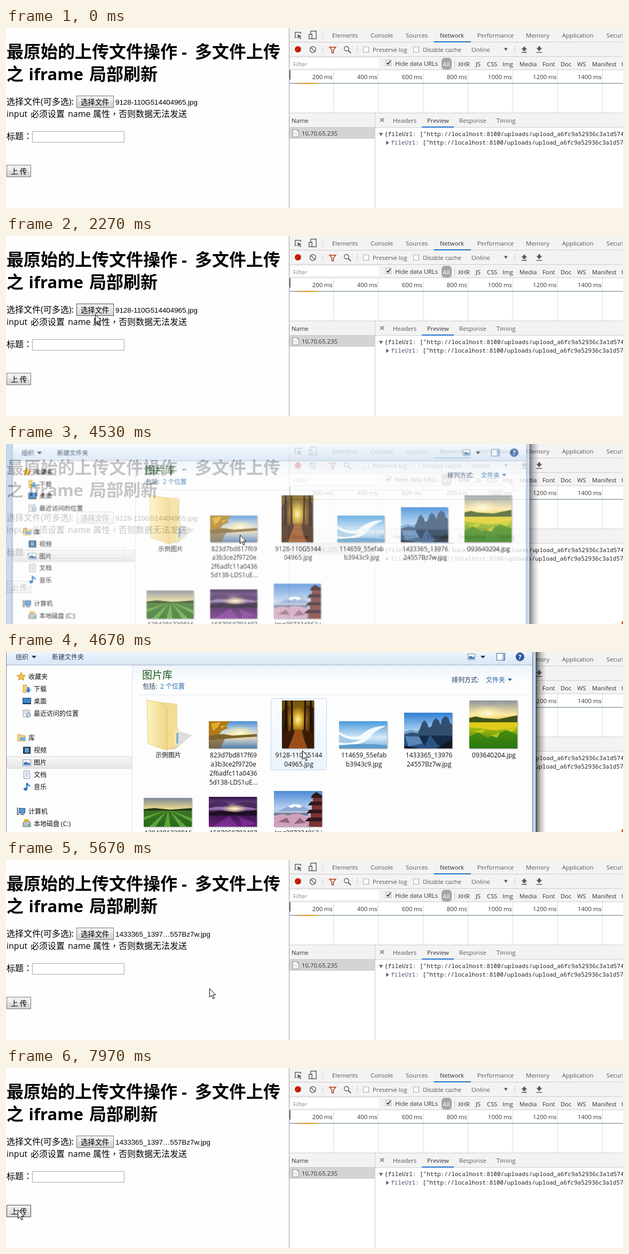
Write an HTML page that moves like this. It is 1156x338 px and loops after 8 s.

```html
<!DOCTYPE html>
<html lang="zh-CN">
<head>
<meta charset="utf-8">
<title>多文件上传</title>
<style>
html, body { margin: 0; width: 100%; height: 100%; overflow: hidden; background: #fff; }
svg { display: block; }
text { font: 16px "Open Sans", "Noto Sans CJK SC", sans-serif; white-space: pre; }
.mid { font-family: "Noto Sans CJK TC", sans-serif; }
.h1 text { font-size: 32px; font-weight: 700; }
.h1 .latin { font-size: 31px; }
.btn text { font-size: 13.33px; }
.btn rect { fill: url(#btn); stroke: #7c7c7c; }
.btn .hover { fill: url(#btnHover); stroke: #4c4c4c; }
.btn .press { fill: #000; fill-opacity: .1; stroke: #4c4c4c; }
.file text { font: 13.33px "Liberation Sans", "Noto Sans CJK SC", sans-serif; }
.tools text { font-size: 11.3px; fill: #5a5a5a; }
.tools .on { fill: #333; }
.tools .code { font: 11px "Noto Sans Mono", monospace; fill: #222; }
.line { stroke: #ccc; fill: none; }
.icon { stroke: #5f5f5f; stroke-width: 1.4; fill: none; }
.box { fill: #fff; stroke: #a6a6a6; }
.dialog text { font-size: 12px; fill: #111; }
.dialog .bar text { fill: #1e395b; }
.names { text-anchor: middle; }
.thumb { filter: drop-shadow(1px 1px 1px #0006); }
.hl { fill: url(#hl); stroke: #b9d7f3; }

/* timeline */
.k { animation: 8s step-end infinite; }
.cursor { animation-name: move, cursorSeen; }
.dialog { animation-name: dialog; transform-origin: 490px 320px; }
@keyframes move {
  0% { transform: translate(528px, 322px); }
  7.75% { transform: translate(528px, 322px); animation-timing-function: steps(10); }
  17% { transform: translate(154px, 137px); }
  28.375% { transform: translate(167px, 147px); }
  32.375% { transform: translate(167px, 140px); }
  38.875% { transform: translate(190px, 132px); }
  42% { transform: translate(190px, 132px); animation-timing-function: steps(2, jump-both); }
  43.75% { transform: translate(321px, 156px); }
  54.375% { transform: translate(321px, 156px); animation-timing-function: steps(4); }
  58.375% { transform: translate(555px, 185px); animation-timing-function: steps(5); }
  62.875% { transform: translate(827px, 177px); }
  69.875% { transform: translate(604px, 209px); }
  70.875% { transform: translate(381px, 241px); }
  74.5% { transform: translate(147px, 258px); }
  76.375% { transform: translate(147px, 258px); animation-timing-function: steps(3, jump-both); }
  79.5% { transform: translate(189px, 262px); }
  81.375% { transform: translate(190px, 262px); }
  87.375% { transform: translate(190px, 262px); animation-timing-function: steps(4, jump-both); }
  91.125% { transform: translate(23px, 269px); }
  94.125%, 100% { transform: translate(22px, 266px); }
}
@keyframes cursorSeen { 0% { opacity: 0; } 7.75% { opacity: 1; } 71.875% { opacity: 0; } 74.5%, 100% { opacity: 1; } }
@keyframes dialog {
  0% { opacity: 0; transform: scale(.93); }
  54.375% { opacity: .35; transform: scale(.93); animation-timing-function: steps(3); }
  57.375% { opacity: 1; transform: none; }
  68.75% { opacity: .995; transform: scale(.992); }
  69.875% { opacity: .4; transform: scale(.95); }
  70.875%, 100% { opacity: 0; transform: scale(.93); }
}
@keyframes pickHover { 0% { opacity: 0; } 28.375% { opacity: 1; } 38.875%, 100% { opacity: 0; } }
@keyframes pickPress { 0% { opacity: 0; } 30.375% { opacity: 1; } 31.375%, 100% { opacity: 0; } }
@keyframes sendHover { 0% { opacity: 0; } 91.125%, 100% { opacity: 1; } }
@keyframes sendPress { 0% { opacity: 0; } 93% { opacity: 1; } 94.125% { opacity: 0; } 97.875% { opacity: 1; } 98.75%, 100% { opacity: 0; } }
@keyframes oldFile { 0% { opacity: 1; } 69.875%, 100% { opacity: 0; } }
@keyframes newFile { 0% { opacity: 0; } 69.875%, 100% { opacity: 1; } }
@keyframes dot { 0% { opacity: 0; } 52.625% { opacity: 1; } 64.75%, 100% { opacity: 0; } }
@keyframes hover1 { 0% { opacity: 0; } 57.375% { opacity: 1; } 59.275%, 100% { opacity: 0; } }
@keyframes hover2 { 0% { opacity: 0; } 60.175% { opacity: 1; } 61.075%, 100% { opacity: 0; } }
@keyframes hover3 { 0% { opacity: 0; } 61.975% { opacity: 1; } 70.875%, 100% { opacity: 0; } }
@keyframes picked { 0% { opacity: 0; } 64.75% { opacity: 1; } 70.875%, 100% { opacity: 0; } }
</style>
</head>
<body>
<svg width="1156" height="338" viewBox="0 0 1156 338">
<defs>
  <linearGradient id="btn" x2="0" y2="1"><stop stop-color="#f3f3f3"/><stop offset=".5" stop-color="#ebebeb"/><stop offset=".5" stop-color="#dfdfdf"/><stop offset="1" stop-color="#d0d0d0"/></linearGradient>
  <linearGradient id="btnHover" x2="0" y2="1"><stop stop-color="#f5f5f5"/><stop offset="1" stop-color="#d6d6d6"/></linearGradient>
  <linearGradient id="shade"><stop stop-color="#000" stop-opacity=".62"/><stop offset=".45" stop-color="#000" stop-opacity=".25"/><stop offset="1" stop-color="#000" stop-opacity="0"/></linearGradient>
  <linearGradient id="bar" x2="0" y2="1"><stop stop-color="#fafcfe"/><stop offset=".5" stop-color="#e6effa"/><stop offset="1" stop-color="#d9e6f5"/></linearGradient>
  <linearGradient id="head" x2="0" y2="1"><stop stop-color="#eef4fb"/><stop offset=".6" stop-color="#fdfdfd"/></linearGradient>
  <linearGradient id="row" x2="0" y2="1"><stop stop-color="#f8f8f8"/><stop offset="1" stop-color="#e5e5e5"/></linearGradient>
  <linearGradient id="hl" x2="0" y2="1"><stop stop-color="#fbfdff"/><stop offset="1" stop-color="#ebf4fd"/></linearGradient>
  <linearGradient id="sel" x2="0" y2="1"><stop stop-color="#dcebfc"/><stop offset="1" stop-color="#c1dbfc"/></linearGradient>
  <linearGradient id="folder"><stop stop-color="#fdf3c0"/><stop offset="1" stop-color="#efd586"/></linearGradient>
  <radialGradient id="glow"><stop stop-color="#fffbe6"/><stop offset=".3" stop-color="#fff3b8" stop-opacity=".8"/><stop offset="1" stop-color="#ffe58a" stop-opacity="0"/></radialGradient>
  <linearGradient id="lake" x2="0" y2="1"><stop stop-color="#4f8fd0"/><stop offset=".35" stop-color="#bcd3e6"/><stop offset=".55" stop-color="#f2dfb4"/><stop offset=".75" stop-color="#a9b9c4"/><stop offset="1" stop-color="#4f7ba8"/></linearGradient>
  <radialGradient id="wood" cy=".4"><stop stop-color="#fff6a8"/><stop offset=".25" stop-color="#d8b02c"/><stop offset=".6" stop-color="#7a4d10"/><stop offset="1" stop-color="#301a06"/></radialGradient>
  <linearGradient id="sky" x2="0" y2="1"><stop stop-color="#4a9bdc"/><stop offset=".6" stop-color="#d5eaf7"/><stop offset="1" stop-color="#6fb0dd"/></linearGradient>
  <linearGradient id="karst" x2="0" y2="1"><stop stop-color="#2f7fd6"/><stop offset=".5" stop-color="#a9cff0"/><stop offset="1" stop-color="#1d3d66"/></linearGradient>
  <linearGradient id="field" x2="0" y2="1"><stop stop-color="#8c96a0"/><stop offset=".3" stop-color="#ffe9a0"/><stop offset=".42" stop-color="#d9bd2a"/><stop offset=".6" stop-color="#9cb80f"/><stop offset="1" stop-color="#256d0e"/></linearGradient>
  <linearGradient id="dusk" x2="0" y2="1"><stop stop-color="#7d8797"/><stop offset=".4" stop-color="#f0dc8e"/><stop offset=".42" stop-color="#3d7424"/><stop offset="1" stop-color="#256a19"/></linearGradient>
  <linearGradient id="violet" x2="0" y2="1"><stop stop-color="#2d1244"/><stop offset=".4" stop-color="#9a78b4"/><stop offset=".5" stop-color="#321640"/><stop offset="1" stop-color="#6b1f80"/></linearGradient>
  <linearGradient id="spring" x2="0" y2="1"><stop stop-color="#4b8ad8"/><stop offset=".5" stop-color="#bcd2ee"/><stop offset="1" stop-color="#b58ba3"/></linearGradient>
  <pattern id="grid" x="530" width="84" height="80" y="79" patternUnits="userSpaceOnUse"><path d="M84 0V80" stroke="#dcdcdc" stroke-width="2"/></pattern>
</defs>

<!-- upload page -->
<rect width="531" height="338" fill="#fefefe"/>
<g class="h1">
  <text x="1" y="56">最原始的上传文件操作</text><text class="latin" x="329" y="56">-</text><text x="354" y="56">多文件上传</text>
  <text x="1" y="98">之</text><text class="latin" x="42.5" y="98">iframe</text><text x="156" y="98">局部刷新</text>
</g>
<text x="1" y="144">选择文件(可多选):</text>
<text y="167"><tspan x="1">input</tspan><tspan x="46">必须设置</tspan><tspan x="116">name</tspan><tspan x="163">属性</tspan><tspan class="mid" lang="zh-TW">，</tspan><tspan>否则数据无法发送</tspan></text>
<text x="1" y="209">标题<tspan class="mid" lang="zh-TW">：</tspan></text>
<rect x="49.5" y="194.5" width="172" height="20" fill="#fff" stroke="#a9a9a9"/>
<g class="btn">
  <rect x="132.5" y="127.5" width="69" height="22"/>
  <rect class="hover k" style="animation-name:pickHover" x="132.5" y="127.5" width="69" height="22"/>
  <rect class="press k" style="animation-name:pickPress" x="132.5" y="127.5" width="69" height="22"/>
  <text x="140" y="144">选择文件</text>
  <rect x="1.5" y="257.5" width="45" height="22"/>
  <rect class="hover k" style="animation-name:sendHover" x="1.5" y="257.5" width="45" height="22"/>
  <rect class="press k" style="animation-name:sendPress" x="1.5" y="257.5" width="45" height="22"/>
  <text y="274"><tspan x="9">上</tspan><tspan x="26">传</tspan></text>
</g>
<g class="file">
  <text class="k" style="animation-name:oldFile" x="205" y="144">9128-110G514404965.jpg</text>
  <text class="k" style="animation-name:newFile" x="205" y="144">1433365_1397…557Bz7w.jpg</text>
</g>

<!-- developer tools -->
<g class="tools">
  <rect x="531" width="625" height="79" fill="#f3f3f3"/>
  <rect x="531" y="79" width="625" height="259" fill="#fff"/>
  <rect x="531" y="79" width="625" height="80" fill="url(#grid)"/>
  <rect x="531" y="160" width="625" height="26" fill="#f3f3f3"/>
  <rect x="531" y="187" width="160" height="21" fill="#d4d4d4"/>
  <path class="line" d="M531 26.5H1156M531 53.5H1156M531 78.5H1156M531 159.5H1156M531 186.5H1156M691.5 160V338M593.5 6V20M593.5 33V48M658.5 33V48M953.5 33V48M840.5 60V75"/>
  <path d="M530.5 0V338" stroke="#9d9d9d"/>
  <path d="M532 79V97" stroke="#666" stroke-width="2"/>
  <path d="M531 104H1156" stroke="#a3b6c0" stroke-width="2"/>
  <path d="M546 104H582" stroke="#d39a1f" stroke-width="2"/>
  <path d="M802 26H871M779 186H839" stroke="#1a73c8" stroke-width="2"/>

  <g class="icon">
    <path d="M545 18H541.7V8.2H552.3V11"/><path d="M546 12L554 15L550.6 16.4L553.5 20L552 21L549.3 17.6L547 20Z" fill="#5f5f5f" stroke="none"/>
    <path d="M571 11V5.7H581.3V20.3H574M567.7 11.7H573.3V20.3H567.7Z"/>
    <circle cx="575" cy="40.5" r="5.5"/><path d="M571 36.5L579 44.5"/>
    <circle cx="638" cy="39" r="4.3"/><path d="M641 42L646 47" stroke-width="2"/>
    <path d="M606 36H618L613.5 41V46.5H610.5V41Z" stroke="#b5301b"/>
    <path d="M701.5 169.5L708 176M708 169.5L701.5 176" stroke-width="1.2"/>
  </g>
  <circle cx="547" cy="40" r="6" fill="#c0210a"/>
  <path d="M933 37.5H940L936.5 43ZM965.5 40.5L971 34.5L976.5 40.5H973V43.5H969V40.5ZM966 45H976V46.5H966ZM993.5 37.5H997V34.5H1001V37.5H1004.5L999 43.5ZM994 45H1004V46.5H994Z" fill="#5a5a5a"/>
  <g class="box">
    <rect x="669.5" y="35.5" width="10" height="10"/><rect x="763.5" y="35.5" width="10" height="10"/><rect x="711.5" y="60.5" width="10" height="10"/>
  </g>
  <path d="M713.5 65.5L716 68L720 62" fill="none" stroke="#333" stroke-width="2"/>
  <rect x="534" y="57" width="164" height="18" fill="#fff"/>
  <rect x="816" y="56" width="19" height="22" rx="6" fill="#a5a5a5"/>

  <text y="18"><tspan x="611">Elements</tspan><tspan x="683">Console</tspan><tspan x="749">Sources</tspan><tspan x="813" class="on">Network</tspan><tspan x="883">Performance</tspan><tspan x="974">Memory</tspan><tspan x="1042">Application</tspan><tspan x="1125">Security</tspan></text>
  <text y="45"><tspan x="687">Preserve log</tspan><tspan x="781">Disable cache</tspan><tspan x="872">Online</tspan></text>
  <text x="538" y="72" style="fill:#8a8a8a">Filter</text>
  <text class="on" y="71"><tspan x="729">Hide data URLs</tspan></text>
  <text x="818.5" y="72" style="fill:#fff">All</text>
  <text class="on" y="72"><tspan x="847">XHR</tspan><tspan x="880">JS</tspan><tspan x="901">CSS</tspan><tspan x="930">Img</tspan><tspan x="962">Media</tspan><tspan x="1005">Font</tspan><tspan x="1039">Doc</tspan><tspan x="1070">WS</tspan><tspan x="1098">Manifest</tspan><tspan x="1153">Other</tspan></text>
  <text class="on" y="96" text-anchor="end"><tspan x="612">200 ms</tspan><tspan x="696">400 ms</tspan><tspan x="780">600 ms</tspan><tspan x="864">800 ms</tspan><tspan x="948">1000 ms</tspan><tspan x="1032">1200 ms</tspan><tspan x="1116">1400 ms</tspan></text>
  <text y="178"><tspan x="535" class="on">Name</tspan><tspan x="725">Headers</tspan><tspan x="789" class="on">Preview</tspan><tspan x="849">Response</tspan><tspan x="919">Timing</tspan></text>
  <path d="M537.5 190.5H545.5L548.5 193.5V204.5H537.5ZM545.5 190.5V193.5H548.5" fill="#fff" stroke="#8c8c8c"/>
  <path d="M540 196.5H546M540 198.5H546M540 200.5H546" stroke="#d4d4d4"/>
  <text class="on" x="554" y="202">10.70.65.235</text>
  <path d="M698.5 197H706.5L702.5 203ZM712 211.5V219.5L718 215.5Z" fill="#6e6e6e"/>
  <text class="code" x="709" y="203">{fileUrl: ["http://localhost:8100/uploads/upload_a6fc9a52936c3a1d574</text>
  <text class="code" x="721" y="219"><tspan fill="#5b4a78">fileUrl</tspan>: ["http://localhost:8100/uploads/upload_a6fc9a52936c3a1d574</text>
</g>
<circle class="k" style="animation-name:dot" cx="1159" cy="337" r="6" fill="#e6572c"/>

<!-- file dialog -->
<g class="dialog k">
  <rect x="993" y="-60" width="18" height="760" fill="url(#shade)"/>
  <rect x="-13" y="-60" width="1006" height="760" fill="#b9d1ea" stroke="#1e2a36"/>
  <path d="M991.5 -60V700" stroke="#e6f1fb"/>
  <rect x=".5" y="-30" width="986" height="700" fill="#fdfdfd" stroke="#6e8196"/>
  <rect x="1" y="-8" width="985" height="32" fill="url(#bar)"/>
  <path d="M1 24.5H986" stroke="#a0afc3"/>
  <rect x="237" y="25" width="749" height="55" fill="url(#head)"/>
  <path d="M250 80.5H973" stroke="#e3e9f1"/>
  <path d="M236.5 25V670" stroke="#d6e0ee"/>
  <g class="bar">
    <text y="14"><tspan x="18">组织</tspan><tspan x="86">新建文件夹</tspan></text>
    <path d="M48 7H57L52.5 12ZM889 7H898L893.5 12Z" fill="#1e395b"/>
    <rect x="865.5" y="3.5" width="13" height="11" fill="#fff" stroke="#6b7f99"/><path d="M867 13V9L871 7L874 10L877 8V13Z" fill="#3a78b5"/>
    <rect x="919.5" y="2.5" width="15" height="13" fill="#fff" stroke="#44648a"/><path d="M930 3H934V15H930Z" fill="#9cc0e4"/>
    <circle cx="963" cy="9" r="7.5" fill="#2d5ca6" stroke="#1c3c74"/><text x="960" y="13.5" style="fill:#fff;font-weight:700">?</text>
    <text x="835" y="57">排列方式:</text><text x="899" y="57" style="fill:#1f66ac">文件夹</text>
    <path d="M940 50H948L944 54.5Z" fill="#1f66ac"/>
    <text x="255" y="50" style="fill:#1d5a1d;font-size:19px">图片库</text>
    <text y="69"><tspan x="256">包括:</tspan><tspan x="289" fill="#1f66ac">2 个位置</tspan></text>
  </g>

  <rect x="2.5" y="196.5" width="232" height="22" rx="2" fill="url(#row)" stroke="#d5d5d5"/>
  <text x="42" y="51">收藏夹</text><text x="52" y="74">下载</text><text x="52" y="97">桌面</text><text x="52" y="120">最近访问的位置</text>
  <text x="42" y="166">库</text><text x="52" y="189">视频</text><text x="52" y="212">图片</text><text x="52" y="235">文档</text><text x="52" y="258">音乐</text>
  <text x="42" y="304">计算机</text><text x="52" y="327">本地磁盘 (C:)</text>
  <path d="M28.5 38L31 43.5L36.5 44L32.5 48L33.5 53L28.5 50.5L23.5 53L24.5 48L20.5 44L26 43.5Z" fill="#f7c443" stroke="#c98a1d"/>
  <path d="M32 62H39V76H32Z" fill="#f3d26f" stroke="#c79b36"/><path d="M40 66H44V71H47L42 77L37 71H40Z" fill="#2f86d8"/>
  <rect x="31.5" y="86.5" width="15" height="11" fill="#3b86cc" stroke="#2b4a6e"/><path d="M32 97H46" stroke="#1c2f48" stroke-width="2"/>
  <path d="M32 109H44V122H32Z" fill="#fafafa" stroke="#8b8b8b"/><circle cx="42" cy="118" r="4" fill="#b9d7ee" stroke="#6c849c"/><path d="M34 112H42M34 115H38" stroke="#999"/>
  <path d="M22 155H28L30 157H36V167H22Z" fill="#f4d479" stroke="#c79b36"/><rect x="26" y="160" width="10" height="6" fill="#6fb1e2"/>
  <rect x="32" y="178" width="14" height="13" fill="#27384a"/><rect x="35" y="180" width="8" height="9" fill="#5f9fd6"/>
  <rect x="31.5" y="202.5" width="15" height="11" fill="#fff" stroke="#7c8ea2"/><path d="M33 212V208L38 206L42 209L45 207V212Z" fill="#3a78b5"/>
  <path d="M33.5 223.5H44.5V237.5H33.5Z" fill="#fff" stroke="#7c8ea2"/><path d="M36 227H42M36 230H42M36 233H42" stroke="#5b92c8"/>
  <path d="M39 246V258M39 246Q41 250 45 252" fill="none" stroke="#2a79cc" stroke-width="2.5"/><ellipse cx="36.5" cy="257.5" rx="3.5" ry="2.8" fill="#2a79cc"/>
  <rect x="24.5" y="293.5" width="11" height="9" fill="#4c9be0" stroke="#3b4c60"/><path d="M21.5 292V305H24M27 305H34" fill="none" stroke="#5c6c7e" stroke-width="2"/>
  <path d="M32 321L35 317H43L46 321V328H32Z" fill="#b7bec6" stroke="#59636e"/><path d="M34 314H42V319H34Z" fill="#e6b22f"/><path d="M41 325H45" stroke="#3fc03f" stroke-width="2"/>

  <rect class="hl k" style="animation-name:hover1" x="496.5" y="87.5" width="104" height="134" rx="2"/>
  <rect class="hl k" style="animation-name:hover2" x="618.5" y="87.5" width="104" height="134" rx="2"/>
  <rect class="hl k" style="animation-name:hover3" x="740.5" y="87.5" width="104" height="134" rx="2"/>
  <rect class="k" style="animation-name:picked" x="740.5" y="87.5" width="104" height="134" rx="2" fill="url(#sel)" stroke="#7da2ce"/>

  <path d="M304 182L322 148L349 156L316 184Z" fill="#000" opacity=".12"/>
  <path d="M282 94L320 98V178L302 184Z" fill="#f3dd92" stroke="#dcb95d" stroke-width=".7"/>
  <path d="M315 146L324 143V173L315 178Z" fill="#f6e6ab"/><path d="M319 152H323V171L319 173Z" fill="#7fb2d8"/>
  <path d="M264 90L294 96L302 104V185L266 172Z" fill="url(#folder)" stroke="#dcb95d" stroke-width=".7"/>

  <g class="thumb" transform="translate(380 130)"><rect width="90" height="51" fill="url(#lake)"/><ellipse cx="58" cy="22" rx="30" ry="14" fill="url(#glow)"/><path d="M0 0H40L32 9L36 13L24 18L18 27L0 32Z" fill="#b07a18"/><path d="M4 4L22 2L16 12L8 18ZM22 9L31 8L24 14Z" fill="#e3ab2c"/><path d="M0 27L26 24L44 27L90 24V29L44 32L0 36Z" fill="#7d6230"/><path d="M0 36L30 33L22 51H0Z" fill="#7c5b24" opacity=".7"/></g>
  <g class="thumb" transform="translate(517 91)"><rect width="60" height="90" fill="url(#wood)"/><path d="M0 0H60V14L46 8L38 18L28 9L20 16L10 9L0 22Z" fill="#7d6010" opacity=".7"/><path d="M6 0H10L11 68H4ZM17 0H20L21 60H17ZM42 0H45L44 62H41ZM52 0H56L58 70H52Z" fill="#241304"/><path d="M27 54H34L48 90H10Z" fill="#9a4e1a"/><path d="M0 60L25 55L12 90H0ZM60 60L37 55L48 90H60Z" fill="#3b1b07"/></g>
  <g class="thumb" transform="translate(624 130)"><rect width="90" height="51" fill="url(#sky)"/><path d="M0 20Q22 34 40 27Q60 8 88 9Q66 18 58 30Q44 48 0 44Z" fill="#f4fafd"/><path d="M0 46Q40 40 90 45V51H0Z" fill="#5d9ccb"/><path d="M0 25Q20 38 42 34Q22 44 0 40Z" fill="#a4cbe8"/></g>
  <g class="thumb" transform="translate(746 114)"><rect width="90" height="67" fill="url(#karst)"/><path d="M0 36L12 32L24 35L36 26L46 33L60 28L90 30V43H0Z" fill="#6f9cca"/><path d="M0 41L14 37L26 39L30 29L34 18L38 14L43 20L46 28L51 26L54 16L59 10L65 15L68 23L71 12L77 6L83 10L86 19L90 22V43H0Z" fill="#324f70"/><path d="M0 43H90V67H0Z" fill="#2a5384"/><path d="M28 43H48L38 62ZM50 43H90V62L76 67L62 60Z" fill="#152c48"/><path d="M2 44L28 45L34 58L8 63Z" fill="#82b0dc" opacity=".55"/><path d="M0 62L30 67H0ZM60 67L90 50V67Z" fill="#0e1a24"/></g>
  <g class="thumb" transform="translate(868 91)"><rect width="90" height="90" fill="url(#field)"/><ellipse cx="34" cy="24" rx="34" ry="15" fill="url(#glow)"/><path d="M0 33L12 30L25 33L55 35L74 31L90 28V42H0Z" fill="#3d5419"/><path d="M0 41H90V50L50 56L0 50Z" fill="#e0cb1b"/><path d="M0 68L16 60L34 70L52 62L70 56L90 64V90H0Z" fill="#2a7d10" opacity=".7"/><path d="M8 58L30 55L24 61ZM40 66L58 60L52 70ZM66 54L88 52L80 59Z" fill="#e6d724" opacity=".7"/></g>
  <g class="thumb" transform="translate(258 274)"><rect width="90" height="54" fill="url(#dusk)"/><path d="M43 23L0 36V42ZM44 23L10 54H22ZM46 23L38 54H50ZM48 23L68 54H80ZM49 23L90 38V45Z" fill="#5fa337"/><path d="M0 21L20 19L50 22L90 19V24H0Z" fill="#223c19"/></g>
  <g class="thumb" transform="translate(380 272)"><rect width="90" height="56" fill="url(#violet)"/><path d="M0 12Q25 3 43 17Q60 5 90 12V23Q63 15 48 23Q20 14 0 22Z" fill="#4a2a60"/><ellipse cx="48" cy="22" rx="24" ry="9" fill="url(#glow)"/><path d="M0 30L20 26L50 29L90 25V35H0Z" fill="#1e0f26"/><path d="M8 56L38 36L55 56ZM62 56L56 37L88 50Z" fill="#8d36a3" opacity=".6"/></g>
  <g class="thumb" transform="translate(502 261)"><rect width="90" height="67" fill="url(#spring)"/><path d="M8 38L34 25H46L74 38Z" fill="#8fa9d2"/><path d="M26 29L34 25H46L54 29L46 32L40 29L33 32Z" fill="#f6f9fd"/><path d="M0 41H64V46H0Z" fill="#6e7f96"/><path d="M0 49Q14 40 26 46Q44 38 62 48V67H0Z" fill="#cfa2ba"/><path d="M8 58L24 50L30 60ZM38 62L48 50L60 60Z" fill="#8f667c"/><path d="M72 7L79 2L90 8V13H69ZM69 20H90V27H64ZM67 35H90V42H61ZM65 50H90V57H58Z" fill="#32191f"/><path d="M73 13H90V20H73ZM71 27H90V35H71ZM69 42H90V50H69ZM66 57H90V67H66Z" fill="#7a342f"/></g>

  <g class="names">
    <text x="304" y="198">示例图片</text>
    <text><tspan x="426" y="198">823d7bd817f69</tspan><tspan x="426" y="215">a3b3ce2f9720e</tspan><tspan x="426" y="232">2f6adfc11a0436</tspan><tspan x="426" y="249">5d138-LDS1uE...</tspan></text>
    <text><tspan x="548.5" y="198">9128-110G5144</tspan><tspan x="548.5" y="215">04965.jpg</tspan></text>
    <text><tspan x="670.5" y="198">114659_55efab</tspan><tspan x="670.5" y="215">b3943c9.jpg</tspan></text>
    <text><tspan x="792.5" y="198">1433365_13976</tspan><tspan x="792.5" y="215">24557Bz7w.jpg</tspan></text>
    <text x="914" y="198">093640204.jpg</text>
    <text y="344"><tspan x="304">1284281330816</tspan><tspan x="426">1587059703487</tspan><tspan x="548">Img387334862.j</tspan></text>
  </g>
</g>

<path class="cursor k" d="M.5 .5V16.5L4.2 13L6.9 19.2L9.3 18.2L6.7 12.2H11.7Z" fill="#fff" stroke="#000"/>
</svg>
</body>
</html>
```
